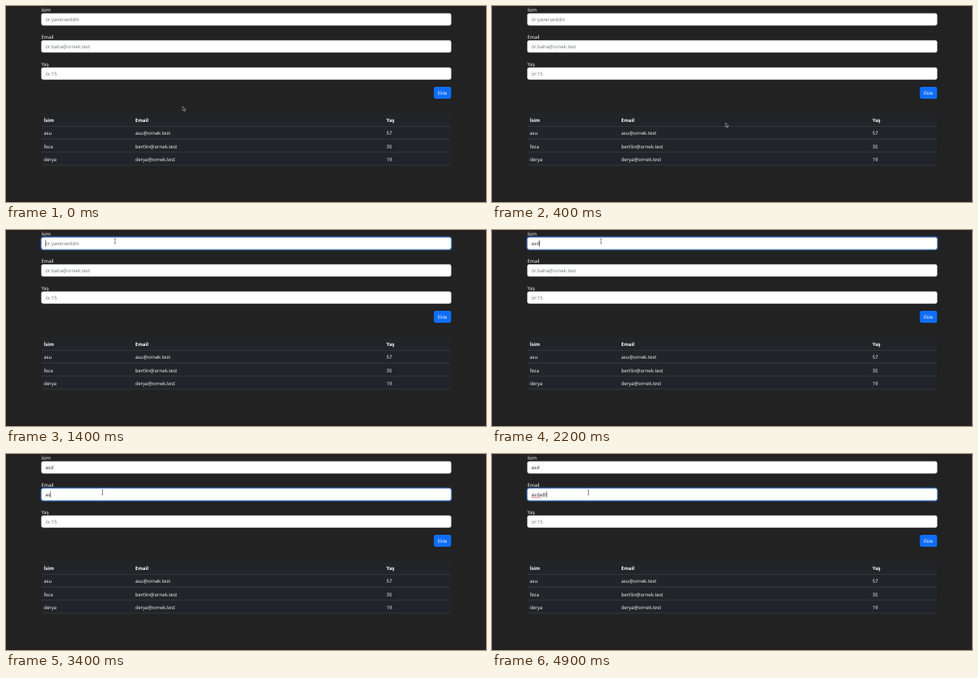
Write an HTML page that moves like this. It is 600 px wide and 245 px high and loops after 5 s.

```html
<!DOCTYPE html>
<html lang="tr">
<head>
<meta charset="utf-8">
<title>Form</title>
<style>
  html, body { margin: 0; width: 100%; height: 100%; overflow: hidden; background: #222; }
  svg { display: block; width: 600px; height: 245px; }
  text { font: 6.05px "Open Sans", "Noto Sans", sans-serif; fill: #fff; white-space: pre; text-rendering: geometricPrecision; }
  .head { font-weight: 700; }
  .value { fill: #212529; }
  .hint { fill: #6b6f74; }
</style>
</head>
<body>
<svg id="stage" viewBox="0 0 600 245"></svg>
<script>
const LOOP = 5000, STEP = 100;
const LEFT = 44.2, WIDTH = 512.2, FIELD_H = 15, ROW_H = 16.2, BODY_Y = 150.5;
const stage = document.getElementById('stage');

function add(tag, attrs, text) {
  const el = document.createElementNS('http://www.w3.org/2000/svg', tag);
  for (const k in attrs) el.setAttribute(k, attrs[k]);
  if (text) el.textContent = text;
  stage.append(el);
  return el;
}
const label = (x, y, text, cls = '') => add('text', { x, y, class: cls }, text);
const show = (el, on) => el.setAttribute('visibility', on ? 'visible' : 'hidden');

// Form: focus and blur times, then typed text by time
const fields = [
  { name: 'İsim', hint: 'ör:yaverseddin', focus: 990, blur: 2975,
    typed: [[1600, 'a'], [1700, 'as'], [1900, 'asd']] },
  { name: 'Email', hint: 'ör:baha@ornek.test', focus: 2975, blur: LOOP,
    typed: [[3300, 'a'], [3400, 'as'], [3500, 'asd'], [3700, 'asda'], [4600, 'asda@']] },
  { name: 'Yaş', hint: 'ör:15', focus: LOOP, blur: LOOP, typed: [] }
];
fields.forEach((f, i) => {
  f.y = 9.2 + i * 33.85;
  label(LEFT, f.y - 2.3, f.name);
  const box = { x: LEFT, y: f.y, width: WIDTH, height: FIELD_H, rx: 2.4 };
  f.ring = add('rect', { x: LEFT - 1.6, y: f.y - 1.6, width: WIDTH + 3.2, height: FIELD_H + 3.2,
    rx: 4, fill: '#0d6efd', 'fill-opacity': 0.3 });
  add('rect', { ...box, fill: '#fff' });
  add('rect', { ...box, fill: 'none', stroke: '#ced4da', 'stroke-width': 0.4 });
  f.edge = add('rect', { ...box, fill: 'none', stroke: '#6ea8fe', 'stroke-width': 0.6 });
  f.hintEl = label(49.2, f.y + 9.6, f.hint, 'hint');
  f.value = label(49.2, f.y + 9.6, '', 'value');
  f.caret = add('rect', { y: f.y + 3.6, width: 0.6, height: 8, fill: '#212529' });
});

add('rect', { x: 534.8, y: 101, width: 21.6, height: 15, rx: 2.4, fill: '#0d6efd' });
label(545.6, 110.6, 'Ekle').setAttribute('text-anchor', 'middle');

// Table
const columns = [47.2, 161.5, 475.5];
const people = [
  ['asu', 'asu@ornek.test', '57'],
  ['feza', 'bertlin@ornek.test', '35'],
  ['derya', 'derya@ornek.test', '19']
];
add('rect', { x: LEFT, y: BODY_Y - ROW_H, width: WIDTH, height: ROW_H * 4, fill: '#212529' });
const rows = people.map((_, i) =>
  add('rect', { x: LEFT, y: BODY_Y + i * ROW_H, width: WIDTH, height: ROW_H, fill: '#323539' }));
[['İsim', 'Email', 'Yaş'], ...people].forEach((cells, i) => {
  const y = BODY_Y + (i - 1) * ROW_H;
  cells.forEach((c, k) => label(columns[k], y + 10.8, c, i ? '' : 'head'));
  add('rect', { x: LEFT, y: y + ROW_H - 0.4, width: WIDTH, height: 0.6, fill: '#41464b' });
});

// Spelling mark
let wave = 'M0 0';
for (let i = 0; i < 10; i++) wave += `q.33 ${i % 2 ? 0.9 : -0.9} .67 0`;
wave += 'h6.5';
const spell = add('path', { d: wave.replace('h6.5', ''), fill: 'none', stroke: '#e33',
  'stroke-width': 0.5, transform: `translate(49.2 ${fields[1].y + 11.3}) scale(1.9 1)` });

// Pointer
const arrow = add('path', { d: 'M0 0V5.3L1.2 4.2 2 6 2.9 5.6 2.1 3.9H3.8Z',
  fill: '#151515', stroke: '#ddd', 'stroke-width': 0.5 });
const beam = add('path', { d: 'M-1 -3H1M0 -3V3M-1 3H1', fill: 'none',
  stroke: '#444', 'stroke-width': 0.6 });
const path = [
  [0, 221, 125.5], [100, 246, 137], [200, 277, 150], [300, 298, 156.5], [400, 292, 146],
  [500, 262, 118], [600, 222, 82], [700, 183, 48], [800, 153, 23], [900, 139, 15],
  [1000, 136.3, 14], [2500, 136.3, 14], [2600, 134, 19], [2700, 129, 31],
  [2800, 123, 43], [2900, 120.5, 48], [5000, 120.5, 48]
];

function pointerAt(t) {
  const i = Math.max(1, path.findIndex(p => p[0] >= t));
  const [a, b] = [path[i - 1], path[i]];
  const k = (t - a[0]) / (b[0] - a[0]);
  return [a[1] + (b[1] - a[1]) * k, a[2] + (b[2] - a[2]) * k];
}
const fade = (t, start) => {
  const k = Math.min(1, Math.max(0, (t - start) / 150));
  return k * k * (3 - 2 * k);
};

function draw(t) {
  for (const f of fields) {
    const past = f.typed.filter(s => s[0] <= t);
    const [last, text] = past.length ? past[past.length - 1] : [f.focus, ''];
    f.value.textContent = text;
    show(f.hintEl, !text);
    const glow = fade(t, f.focus) - fade(t, f.blur);
    f.ring.setAttribute('opacity', glow);
    f.edge.setAttribute('opacity', glow);
    f.caret.setAttribute('x', 49.2 + (text ? f.value.getComputedTextLength() : 0));
    show(f.caret, t >= f.focus && t < f.blur && (t - last) % 1000 < 500);
  }
  show(spell, t >= 4600);

  const [x, y] = pointerAt(t);
  const inField = fields.some(f => y >= f.y && y <= f.y + FIELD_H);
  const move = `translate(${x} ${y})`;
  arrow.setAttribute('transform', move);
  beam.setAttribute('transform', move);
  show(arrow, !inField);
  show(beam, inField);
  rows.forEach((r, i) => show(r, Math.floor((y - BODY_Y) / ROW_H) === i));
}

const start = performance.now();
function tick() {
  const t = Math.max(0, performance.now() - start) % LOOP;
  draw(Math.floor(t / STEP) * STEP);
  requestAnimationFrame(tick);
}
tick();
</script>
</body>
</html>
```
